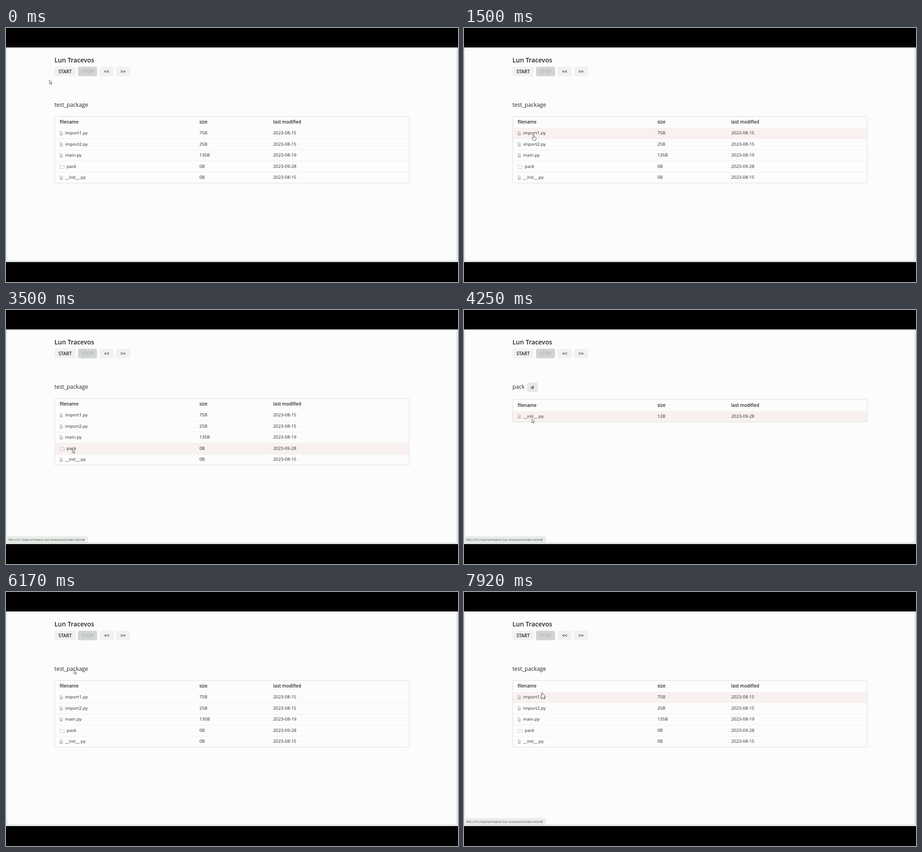
Animation of 998 by 561 pixels, one loop 8000 ms. Source, as an HTML page:

```html
<!DOCTYPE html>
<html lang="en">
<head>
<meta charset="utf-8">
<title>File browser</title>
<style>
html, body { margin: 0; width: 100%; height: 100%; overflow: hidden; background: #000; }
svg { display: block; width: 998px; height: 561px; }
text { font: 9.8px "Open Sans", "Noto Sans", sans-serif; fill: #25282c; white-space: pre; }
.brand { font-size: 14px; font-weight: 600; }
.heading { font-size: 12.3px; }
.head text { font-weight: 600; }
.button text { font-size: 10.2px; font-weight: 600; text-anchor: middle; }
.button rect { fill: #f1f1ef; }
.button.off rect { fill: #d2d4d4; }
.button.off text { fill: #aeb3ba; }
.button.back rect { fill: #e7e8e7; }
.button.back text { font: bold 10px "DejaVu Sans", sans-serif; }
.code { font: 8.55px "Noto Sans Mono", "DejaVu Sans Mono", monospace; }
.op { fill: #7c80d8; }
.url { font-size: 7.6px; fill: #4c504e; }
.frame { fill: none; stroke: #dcdfdd; }
.line { stroke: #eeefec; }

.root, .pack, .file, .status, .hover, .hand, .arrow { animation: 8s step-end infinite; }
.root { animation-name: root; }
.pack { animation-name: pack; }
.file { animation-name: file; }
.status { animation-name: status; }
.hover { animation-name: hover; fill: #f9f1ef; }
.hand { animation-name: hand; }
.arrow { animation-name: arrow; }
.cursor { animation: move 8s ease-in-out infinite; }

@keyframes root { 0%, 75% { opacity: 1 } 48% { opacity: 0 } }
@keyframes pack { 0%, 57%, 75% { opacity: 0 } 48%, 66% { opacity: 1 } }
@keyframes file { 0%, 66% { opacity: 0 } 57% { opacity: 1 } }
@keyframes status { 0%, 57% { opacity: 0 } 39%, 84% { opacity: 1 } }
@keyframes hover {
  0%, 23%, 48%, 57% { opacity: 0; transform: none }
  13.2%, 36.9%, 82.6% { opacity: 1; transform: none }
  38.2% { opacity: 1; transform: translateY(24.5px) }
  39.5% { opacity: 1; transform: translateY(49px) }
  40.9% { opacity: 1; transform: translateY(73.5px) }
  52.5% { opacity: 1; transform: translateY(2.5px) }
}
@keyframes hand {
  0%, 21.3%, 48%, 57%, 67%, 75% { opacity: 0 }
  14.2%, 44.2%, 53.2%, 62%, 69.5%, 96.5% { opacity: 1 }
}
@keyframes arrow {
  0%, 21.3%, 48%, 57%, 67%, 75% { opacity: 1 }
  14.2%, 44.2%, 53.2%, 62%, 69.5%, 96.5% { opacity: 0 }
}
@keyframes move {
  0%, 6% { transform: translate(96px, 115px) }
  16%, 20% { transform: translate(154px, 236px) }
  29%, 32.5% { transform: translate(184.5px, 175.5px) }
  43.5%, 49% { transform: translate(146.5px, 307px) }
  54%, 58% { transform: translate(150px, 236px) }
  63%, 66% { transform: translate(183px, 172px) }
  71%, 77% { transform: translate(150px, 172px) }
  86%, 91% { transform: translate(125.5px, 239px) }
  98%, 100% { transform: translate(173px, 222px) }
}
</style>
</head>
<body>
<svg viewBox="0 0 998 561">
  <defs>
    <g id="doc" fill="none" stroke="#8f9498" stroke-width=".8">
      <path d="M119.5-6.8h3.2l2 2v6h-5.2z"/>
      <path d="M120.6-3.6h2.2M120.6-1.8h3M120.6 0h3"/>
    </g>
    <path id="folder" d="M119.4-5.8h3.4l1 1.2h4.8v6.2h-9.2z" fill="none" stroke="#b9bcb8" stroke-width=".8"/>
    <g id="columns" class="head">
      <text x="118.5">filename</text><text x="427">size</text><text x="590">last modified</text>
    </g>
  </defs>

  <rect y="43" width="998" height="474" fill="#e8ebe8"/>
  <path d="M2.5 43H995.5V508.500a6 6 0 0 1-6 6H8.500a6 6 0 0 1-6-6z" fill="#fcfcfd"/>
  <path d="M2.500 508.500a6 6 0 0 0 6 6H989.500a6 6 0 0 0 6-6V43" fill="none" stroke="#cfd2cf"/>

  <text class="brand" x="107" y="76">Lun Tracevos</text>
  <g class="button"><rect x="107" y="85.500" width="47" height="21" rx="4"/><text x="130.500" y="99.700">START</text></g>
  <g class="button off"><rect x="159" y="85.500" width="42" height="21" rx="4"/><text x="180" y="99.700">STOP</text></g>
  <g class="button"><rect x="207" y="85.500" width="30.500" height="21" rx="4"/><text x="222.300" y="99.700">&lt;&lt;</text></g>
  <g class="button"><rect x="243" y="85.500" width="31" height="21" rx="4"/><text x="258.500" y="99.700">&gt;&gt;</text></g>
  <path d="M87 124.500H911" stroke="#f6f6f1"/>

  <rect class="hover" x="108" y="220.500" width="782.500" height="24.500"/>

  <g class="root">
    <text class="heading" x="107" y="174">test_package</text>
    <rect class="frame" x="107.500" y="195.500" width="783" height="147" rx="1.500"/>
    <path class="line" d="M108 244.500H890M108 269.500H890M108 293.500H890M108 318.500H890"/>
    <use href="#columns" y="211.300"/>
    <g transform="translate(0 235.400)">
      <use href="#doc"/><text x="130.500">import1.py</text><text x="427">75B</text><text x="590">2023-08-15</text>
    </g>
    <g transform="translate(0 259.900)">
      <use href="#doc"/><text x="130.500">import2.py</text><text x="427">25B</text><text x="590">2023-08-15</text>
    </g>
    <g transform="translate(0 284.400)">
      <use href="#doc"/><text x="130.500">main.py</text><text x="427">135B</text><text x="590">2023-08-19</text>
    </g>
    <g transform="translate(0 308.900)">
      <use href="#folder"/><text x="134">pack</text><text x="427">0B</text><text x="590">2023-09-28</text>
    </g>
    <g transform="translate(0 333.400)">
      <use href="#doc"/><text x="130.500">__init__.py</text><text x="427">0B</text><text x="590">2023-08-15</text>
    </g>
  </g>

  <g class="pack">
    <text class="heading" x="107" y="174">pack</text>
    <g class="button back"><rect x="139" y="160" width="24" height="21" rx="4"/><text x="151" y="175">↺</text></g>
    <rect class="frame" x="107.500" y="197.500" width="783" height="50" rx="1.500"/>
    <use href="#columns" y="213.800"/>
    <g transform="translate(0 237.900)">
      <use href="#doc"/><text x="130.500">__init__.py</text><text x="427">12B</text><text x="590">2023-09-28</text>
    </g>
  </g>

  <g class="file">
    <text class="heading" x="107" y="174">__init__.py</text>
    <g class="button back"><rect x="167" y="160" width="24.500" height="21" rx="4"/><text x="179" y="175">↺</text></g>
    <rect class="frame" x="107.500" y="197.500" width="783" height="23" rx="1.500"/>
    <text class="code" x="118.500" y="212.300">1:__all__ <tspan class="op">=</tspan> []</text>
  </g>

  <g class="status">
    <path d="M3 499.500H178.500a2 2 0 0 1 2 2V514H8a5 5 0 0 1-5-5z" fill="#e9ece8"/>
    <text class="url" x="5.500" y="509.500">file:///C:/Users/miveo/.lun-tracevos/index.html#</text>
  </g>

  <g class="cursor" fill="#fff" stroke="#33363a" stroke-width=".8" stroke-linejoin="round">
    <path class="arrow" d="M0 0V8.600L2 6.800 3.400 9.900 4.700 9.300 3.400 6.300H5.900z"/>
    <path class="hand" d="M-1.500 7.500V1a1 1 0 0 1 2 0V4.500L4 5.200Q5.200 5.500 5.200 6.800V9L4.200 12.300H-.8L-3.600 8.300Q-4 7.200-3 6.900z"/>
  </g>
</svg>
</body>
</html>
```
